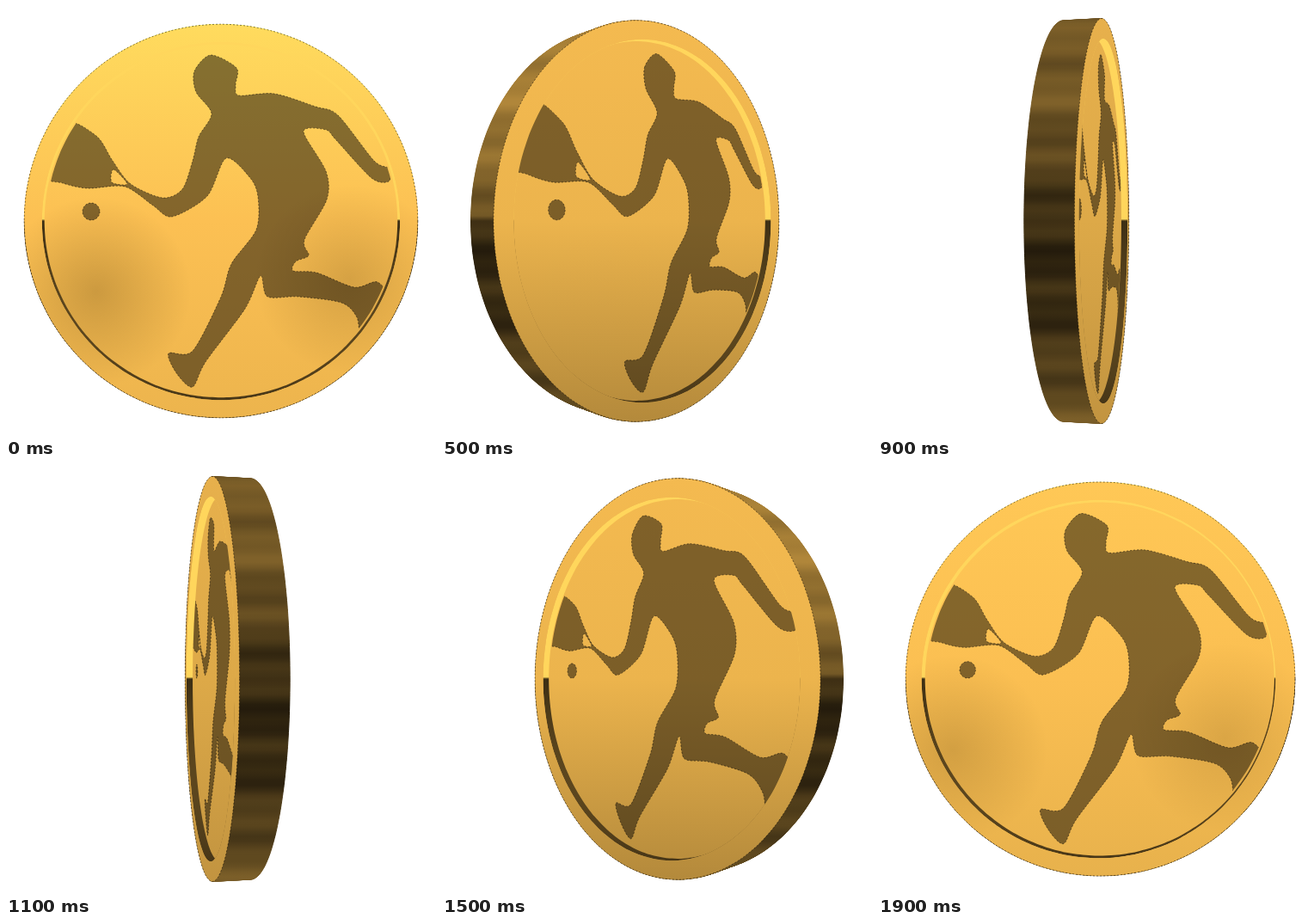
Write an HTML page with a canvas that moves like this. It is 500 by 500 pixels and loops after 2000 ms.

```html
<!DOCTYPE html>
<html lang="en">
<head>
<meta charset="utf-8">
<title>Spinning gold coin</title>
<style>
  html, body { margin: 0; height: 100%; overflow: hidden; background: #fff; }
  canvas { display: block; width: 500px; height: 500px; }
</style>
</head>
<body>
<canvas id="stage" width="500" height="500"></canvas>
<script>
const ctx = document.getElementById('stage').getContext('2d');
const CENTER = 250, CAMERA = 685;
const COIN_RADIUS = 222, FIELD_RADIUS = 202, HALF_THICKNESS = 20.4, FIELD_HEIGHT = 11;
const STEPS = 20, STEP_MS = 100;

// Key points of the player, clockwise; a smooth curve joins them.
const headAndArm = [
  [219, 76], [238, 57], [268, 72], [267, 92], [271, 104], [312, 102], [360, 117], [386, 127],
  [428, 180], [446, 189], [445, 204], [425, 200], [384, 156], [372, 144], [346, 146]
];
const hipsAndLegs = [
  [372, 192], [373, 225], [347, 272], [352, 290], [337, 297], [334, 308], [361, 310], [405, 327],
  [432, 321], [445, 345], [415, 390], [408, 362], [390, 345], [340, 338], [304, 338], [296, 314],
  [278, 352], [232, 414], [217, 443], [199, 428], [189, 404], [217, 401], [250, 338], [262, 300],
  [291, 260], [293, 222], [284, 200]
];
const racketArm = [
  [256, 177], [234, 221], [193, 245], [171, 232], [138, 210], [95, 212], [66, 206], [45, 196],
  [68, 136], [105, 151], [124, 180], [145, 207], [182, 223], [205, 213], [217, 180],
  [224, 152], [239, 125], [221, 100]
];
const throat = [[125, 190], [123, 205], [141, 207]];

const ring = (radius, x = 0, y = 0) => Array.from({ length: 48 }, (_, i) => {
  const a = i * Math.PI / 24;
  return [x + radius * Math.cos(a), y + radius * Math.sin(a)];
});
const toCoin = points => points.map(p => p.map(v => (v - CENTER) * (1 - FIELD_HEIGHT / CAMERA)));
const player = [[...headAndArm, ...hipsAndLegs, ...racketArm], throat, ring(10, 99, 239)].map(toCoin);

function project(points, height, angle) {
  const c = Math.cos(angle), s = Math.sin(angle);
  return points.map(([u, v]) => {
    const scale = CAMERA / (CAMERA - height * c + u * s);
    return [CENTER + (u * c + height * s) * scale, CENTER + v * scale];
  });
}

// Closed smooth curve through each list of points.
function outline(...shapes) {
  const path = new Path2D();
  for (const points of shapes) {
    const at = i => points[(i + points.length) % points.length];
    const handle = (i, k) => at(i).map((v, axis) => v + k * (at(i + 1)[axis] - at(i - 1)[axis]) / 7);
    path.moveTo(...at(0));
    points.forEach((_, i) => path.bezierCurveTo(...handle(i, 1), ...handle(i + 1, -1), ...at(i + 1)));
    path.closePath();
  }
  return path;
}

const gold = level => `rgb(${Math.min(255, 1.31 * level)},${level},${0.43 * level})`;

// Vertical gradient whose gold level is a function of the height, 0 to 1.
function shaded(levelAt, stops) {
  const gradient = ctx.createLinearGradient(0, 14, 0, 486);
  for (let i = 0; i <= stops; i++) gradient.addColorStop(i / stops, gold(levelAt(i / stops)));
  return gradient;
}

function facePaint(angle) {
  const tilt = Math.cos(2 * angle);
  const flash = 30 * Math.cos(angle - 0.09) ** 60;
  const levels = [186 + 10 * tilt + flash, 180 + 12 * tilt, 137 + 15 * tilt + 28 * tilt ** 2];
  return shaded(t => levels[2 * t], 2);
}

function edgePaint(angle) {
  const glow = 150 * Math.cos(angle) ** 4;
  return shaded(t => 38 + 50 * Math.cos(Math.PI * (t - 0.12)) ** 2
    + 9 * Math.sin(40 * t) + 6 * Math.sin(97 * t) + (t < 0.5 ? glow : 0), 80);
}

const wallPaint = shaded(t => t < 0.5 ? 214 : 46 + 24 * Math.sin(2 * Math.PI * (t - 0.5)), 200);

function softShade(x, y, alpha) {
  const gradient = ctx.createRadialGradient(x, y, 0, x, y, 110);
  gradient.addColorStop(0, `rgba(122,88,30,${alpha})`);
  gradient.addColorStop(1, 'rgba(122,88,30,0)');
  ctx.fillStyle = gradient;
  ctx.fillRect(0, 0, 500, 500);
}

function paintFace(shape, angle) {
  ctx.save();
  ctx.clip(shape);
  ctx.fillStyle = facePaint(angle);
  ctx.fillRect(0, 0, 500, 500);
  const alpha = 0.34 * Math.max(0, 1 - Math.abs(angle) / 0.8);
  softShade(105 + 115 * angle, 332, alpha);
  softShade(400 - 25 * angle, 318, alpha * 0.8);
  ctx.restore();
}

function draw(step) {
  ctx.clearRect(0, 0, 500, 500);
  const angle = (step > STEPS / 2 ? step - STEPS : step) * Math.PI / STEPS;
  const disc = (radius, height) => outline(project(ring(radius), height, angle));

  ctx.fillStyle = ctx.strokeStyle = edgePaint(angle);
  ctx.lineWidth = 1;
  for (let h = -HALF_THICKNESS; h <= HALF_THICKNESS; h += 0.6) {
    const slice = disc(COIN_RADIUS, h);
    ctx.fill(slice);
    ctx.stroke(slice);
  }
  if (CAMERA * Math.cos(angle) <= HALF_THICKNESS) return;

  const face = disc(COIN_RADIUS, HALF_THICKNESS);
  paintFace(face, angle);
  ctx.strokeStyle = 'rgba(0,0,0,0.6)';
  ctx.lineWidth = 0.8;
  ctx.setLineDash([2, 2]);
  ctx.stroke(face);

  // The opening hides whatever part of the sunken field lies behind the rim.
  ctx.save();
  const opening = disc(FIELD_RADIUS, HALF_THICKNESS);
  ctx.clip(opening);
  ctx.fillStyle = wallPaint;
  ctx.fill(opening);
  paintFace(disc(FIELD_RADIUS, FIELD_HEIGHT), angle);
  ctx.clip(disc(FIELD_RADIUS - 2, FIELD_HEIGHT));
  const silhouette = outline(...player.map(part => project(part, FIELD_HEIGHT, angle)));
  ctx.fillStyle = 'rgba(0,0,0,0.48)';
  ctx.fill(silhouette);
  ctx.stroke(silhouette);
  ctx.restore();
  ctx.setLineDash([]);
}

function tick() {
  draw(Math.floor(performance.now() / STEP_MS) % STEPS);
  requestAnimationFrame(tick);
}
tick();
</script>
</body>
</html>
```
